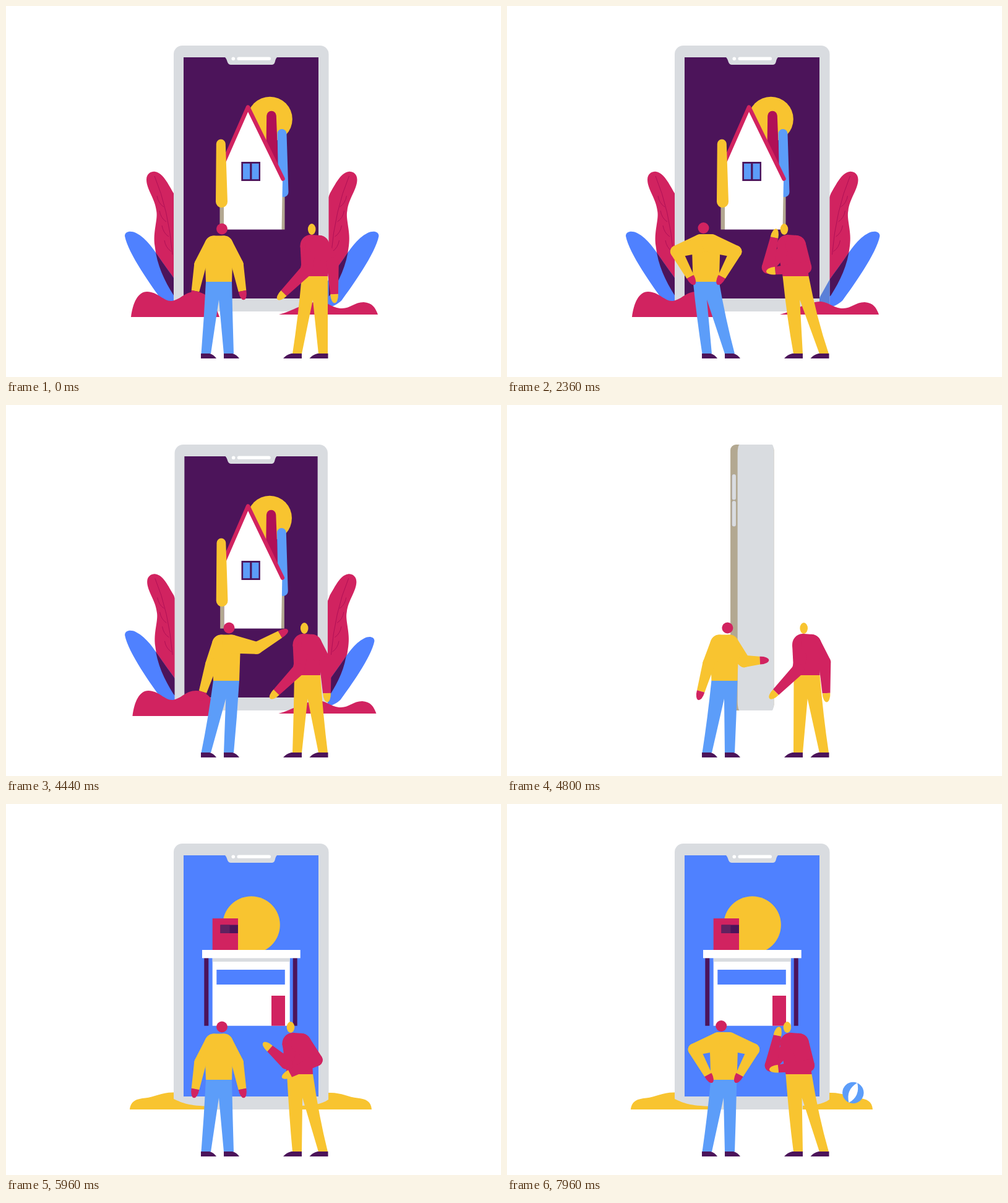
Write an HTML page with a canvas that moves like this. It is 800 px wide and 600 px high and loops after 8000 ms.

```html
<!DOCTYPE html>
<html lang="en">
<head>
<meta charset="utf-8">
<title>House viewing</title>
<style>
html, body { margin: 0; width: 100%; height: 100%; overflow: hidden; background: #fff; }
canvas { display: block; width: 800px; height: 600px; }
</style>
</head>
<body>
<canvas id="stage" width="800" height="600"></canvas>
<script>
const ctx = document.getElementById('stage').getContext('2d');
const LOOP = 8000, MID = 396.25, { PI } = Math;
const RED = '#d12360', WINE = '#b01056', YELLOW = '#f8c430', SKY = '#5c9df9',
  BLUE = '#4f81ff', PURPLE = '#4c145a', GREY = '#d9dce0', BEIGE = '#b3a891', WHITE = '#fff';

const clamp = v => Math.min(1, Math.max(0, v));
const ease = p => (1 - Math.cos(PI * clamp(p))) / 2;
const lerp = (a, b, k) => a + (b - a) * k;
const mix = (a, b, k) => a.map((v, i) => lerp(v, b[i], k));

function fill(color, path) { ctx.fillStyle = color; ctx.fill(path); }
function rect(color, x, y, w, h) { ctx.fillStyle = color; ctx.fillRect(x, y, w, h); }
function round(color, x, y, w, h, r) {
  ctx.fillStyle = color; ctx.beginPath(); ctx.roundRect(x, y, w, h, r); ctx.fill();
}
function oval(color, x, y, rx, ry = rx, turn = 0, from = 0, to = 2 * PI) {
  ctx.fillStyle = color; ctx.beginPath(); ctx.ellipse(x, y, rx, ry, turn, from, to); ctx.fill();
}
function poly(color, ...pts) {
  ctx.fillStyle = color; ctx.beginPath(); pts.forEach(p => ctx.lineTo(...p)); ctx.fill();
}
function scoped(draw) { ctx.save(); draw(); ctx.restore(); }

// Two circles joined by their outer tangents; a flat end stops at the second centre.
function taper(color, [ax, ay], ra, [bx, by], rb, flat = false) {
  const turn = Math.atan2(by - ay, bx - ax), d = Math.hypot(bx - ax, by - ay) || 1;
  const k = Math.acos(Math.max(-1, Math.min(1, (ra - rb) / d)));
  ctx.fillStyle = color;
  ctx.beginPath();
  ctx.arc(ax, ay, ra, turn + k, turn - k + 2 * PI);
  if (flat) {
    for (const side of [-PI / 2, PI / 2]) ctx.lineTo(bx + rb * Math.cos(turn + side), by + rb * Math.sin(turn + side));
  } else ctx.arc(bx, by, rb, turn - k, turn + k);
  ctx.fill();
  return turn;
}

// A pose is left elbow and wrist, right elbow and wrist, head; x counts from the hip centre.
const even = (ex, ey, wx, wy, hx, hy) => [ex, ey, wx, wy, -ex, ey, -wx, wy, hx, hy];
const manPose = {
  down: even(-30, 418, -38, 461, 5, 360.5),
  hips: even(-48, 397, -25.5, 438, -4.2, 359),
  point: [-24, 419, -38, 464, 49, 393, 87, 371, 4.5, 360.5],
  fold: [-27, 417, -38.5, 462, 11, 440, 22, 463.5, 5.5, 360.5]
};
const palPose = {
  down: [-14, 428, -50, 464.5, 29, 416, 31.5, 466, -4.8, 361],
  wave: [-22, 419, -48.5, 395.5, 27, 414, -16, 436, -15, 361],
  think: [-45, 423, -34.5, 374.5, 16, 423, -33, 428, -18.5, 361]
};

// Moves are start, duration, pose, hip centre. Both people settle, sway right, then sway back.
const manLook = (at, sway, back) => [
  [at, 630, 'hips', 339], [sway, 600, 'hips', 355], [back, 500, 'hips', 321.7]
];
const palLook = (at, sway, back) => [
  [at, 370, 'wave', 475], [at + 370, 340, 'think', 466.5], [sway, 580, 'think', 498], [back, 460, 'think', 466.5]
];

const man = {
  poses: manPose, hip: 344, waist: 446, shirt: YELLOW, pants: SKY, skin: RED,
  shoulders: [[-8, 15], [8, 15]], roots: [15, 15], sway: 0, head: [9, 9],
  crotch: hip => 344 + (hip - 344) * 0.94,
  feet: [315.5, 331, 352, 368], shoes: [[315, 1], [352, 1]],
  moves: [
    ...manLook(150, 1050, 1840),
    [2800, 640, 'down', 341], [3620, 600, 'point', 356], [4480, 680, 'fold', 346], [5160, 360, 'down', 344],
    ...manLook(6150, 7000, 7840)
  ]
};
const pal = {
  poses: palPose, hip: 499, waist: 437, shirt: RED, pants: YELLOW, skin: YELLOW,
  shoulders: [[-6, 17.5], [7, 16.5]], roots: [9, 16.5], sway: 0.5, head: [6.3, 9],
  crotch: hip => 484 + (hip - 482) * 0.7,
  feet: [463, 478, 505, 520], shoes: [[478, -1.2], [520.5, -1.2]],
  moves: [
    ...palLook(150, 1060, 1800),
    [2700, 360, 'wave', 480], [3060, 380, 'down', 499], [3800, 640, 'down', 487], [4480, 640, 'down', 482],
    ...palLook(5590, 6860, 7620)
  ]
};

function poseAt({ poses, hip, moves }, t) {
  let now = [hip, ...poses.down];
  for (const [at, span, pose, x] of moves) {
    if (t > at) now = mix(now, [x, ...poses[pose]], ease((t - at) / span));
  }
  return now;
}

function legs(color, hip, waist, crotch, [a, b, c, d]) {
  const l = hip - 21, r = hip + 21;
  ctx.fillStyle = color;
  ctx.beginPath();
  ctx.moveTo(l, waist);
  ctx.quadraticCurveTo(lerp(l, a, 0.4), 505, a, 562.5);
  ctx.lineTo(b, 562.5);
  ctx.lineTo(crotch, 475);
  ctx.lineTo(c, 562.5);
  ctx.lineTo(d, 562.5);
  ctx.quadraticCurveTo(lerp(r, d, 0.4), 505, r, waist);
  ctx.fill();
}

function shoe(heel, dir) {
  ctx.fillStyle = PURPLE;
  ctx.beginPath();
  ctx.moveTo(heel, 562);
  ctx.lineTo(heel + 14 * dir, 562);
  ctx.quadraticCurveTo(heel + 21 * dir, 564, heel + 25 * dir, 570);
  ctx.lineTo(heel, 570);
  ctx.fill();
}

function person(who, t) {
  const { waist, shirt, skin } = who;
  const [hip, ...pose] = poseAt(who, t);
  const joint = i => [hip + pose[i], pose[i + 1]];
  const head = joint(8);
  const lean = (pose[8] + 4.8) * who.sway, y = 386.5 + (head[1] - 360.5) * 1.7;
  const [[lx, lr], [rx, rr]] = who.shoulders;
  const tops = [[hip + lx + lean, y], [hip + rx + lean, y]];

  legs(who.pants, hip, waist - 0.5, who.crotch(hip), who.feet);
  who.shoes.forEach(s => shoe(...s));
  taper(shirt, tops[0], lr, tops[1], rr);
  poly(shirt, [tops[0][0] - lr, y], [tops[1][0] + rr, y], [hip + 21, waist], [hip - 21, waist]);
  tops.forEach((top, i) => {
    const elbow = joint(4 * i), wrist = joint(4 * i + 2);
    taper(shirt, top, who.roots[i], elbow, 9.8);
    const turn = taper(shirt, elbow, 9.8, wrist, 6.4, true);
    oval(skin, ...wrist, 14.5, 6.4, turn, -PI / 2, PI / 2);
  });
  oval(skin, ...head, ...who.head);
}

function cottage() {
  rect(PURPLE, 287, 83, 218, 390);
  oval(YELLOW, 426.5, 183, 36.3);
  taper(WINE, [429, 177.5], 7.8, [430, 260], 10);
  rect(BEIGE, 445, 300, 5.5, 61.5);
  rect(BEIGE, 345.5, 320, 6.5, 41.5);
  taper(SKY, [446, 206.5], 7.5, [448.5, 301], 8);
  poly(WHITE, [391, 166], [447, 281], [445.5, 361.5], [352, 361.5], [352, 244]);
  ctx.strokeStyle = RED;
  ctx.lineWidth = 6.5;
  ctx.lineCap = ctx.lineJoin = 'round';
  ctx.stroke(new Path2D('M353 250L391 163.500L447.500 279.500'));
  taper(YELLOW, [347.3, 223], 7.5, [348.5, 316.5], 9.5);
  rect(PURPLE, 380.3, 252, 30.7, 31);
  for (const x of [383, 397.4]) rect(SKY, x, 254.8, 11.2, 25.4);
}

function beachHouse() {
  rect(BLUE, 287, 83, 218, 390);
  oval(YELLOW, 396.5, 195.5, 46.3);
  rect(BLUE, 340, 236, 120, 10);
  rect(RED, 333.7, 185, 41.3, 52);
  rect(PURPLE, 346.5, 195.5, 28.5, 13.5);
  rect('#61225f', 346.5, 195.5, 15, 13.5);
  for (const x of [320.3, 463.7]) rect(PURPLE, x, 249, 7, 109.7);
  rect(WHITE, 333.7, 249, 125, 109.7);
  rect(GREY, 333.7, 249, 125, 6);
  rect(WHITE, 317, 236, 158.7, 13.3);
  rect(BLUE, 340.3, 268, 110.5, 24);
  rect(RED, 429, 310, 22, 48.7);
}

function phone(turn) {
  const c = Math.cos(turn), s = Math.sin(turn);
  const face = 250.5 * Math.abs(c), edge = 15 * Math.max(0, Math.abs(s) - 0.2);
  const w = face + edge, x = MID - w / 2, right = s * c > 0;
  if (edge) {
    round(BEIGE, x, 64, w, 430, Math.min(9, w / 2));
    const bw = edge * 0.55, bx = (right ? x + face : x) + edge * 0.22;
    for (const y of [112, 155]) {
      round('#8f8590', bx - 0.4, y, bw, 41.5, bw / 2);
      round(GREY, bx, y, bw, 41.5, bw / 2);
    }
  }
  scoped(() => {
    ctx.translate((right ? x : x + edge) + face / 2, 0);
    ctx.scale(Math.max(Math.abs(c), 0.001), 1);
    ctx.translate(-MID, 0);
    round(GREY, 271, 64, 250.5, 430, 14);
    if (c < 0) return;
    if (turn < PI) cottage(); else beachHouse();
    fill(GREY, new Path2D('M354 83H438C434 86 436 95 430 95H363C357 95 358 86 354 83Z'));
    oval(WHITE, 367.3, 85.2, 2.8);
    round(WHITE, 373.5, 82.6, 54.5, 5.2, 2.6);
  });
}

function aboutMid(turn, draw) {
  scoped(() => {
    ctx.translate(MID, 0);
    ctx.scale(Math.cos(turn), 1);
    ctx.translate(-MID, 0);
    draw();
  });
}

function flip() { ctx.translate(794.5, 0); ctx.scale(-1, 1); }

const redLeaf = new Path2D('M227 281C227 270 236 267 241 268C254 270 262 288 271 303L285 340V480L271 468C256 444 244 420 240.500 388C237 365 246 345 243 331C241 312 227 296 227 281Z');
const blueLeaf = new Path2D('M192 372C192 364 202 363 210 367C228 376 240 396 247 406C258 422 270 438 274 444L293 478L276 489C268 487 258 482 252 476C236 454 197 400 192 372Z');
const hills = new Path2D('M202 503C205 480 213 462 228 462C245 462 255 478 268 477C282 475 289 462 306 462C326 463 338 480 345 503ZM441 499C465 493 480 480 505 478C520 478 527 489 543 489C557 489 563 479 578 479C592 480 597 488 601 499Z');
const dunes = new Path2D('M200 494C202 479 212 477 225 475.500C240 474 252 466 271 466.500V477C286 484 295 488 330 489V494ZM591 494C590 481 582 477 568 475.500C553 474 541 466 521 467V478C510 486 495 487 478 488V494Z');

function veins() {
  ctx.strokeStyle = WINE;
  ctx.lineWidth = 1;
  ctx.beginPath();
  ctx.moveTo(240, 275);
  ctx.quadraticCurveTo(263, 330, 269, 402);
  for (let i = 0; i < 4; i++) {
    const x = 255 + i * 4, y = 325 + i * 24;
    ctx.moveTo(x, y);
    ctx.quadraticCurveTo(x - 9, y - 6, x - 11, y - 18);
  }
  ctx.stroke();
}

// Leaves shrink into their root; the right-hand pair is mirrored.
function leaves(t, mirrored) {
  const sink = (start, draw) => scoped(() => {
    const s = 1 - ease((t - start) / 500);
    ctx.translate(272, 482);
    ctx.scale(s, s);
    ctx.translate(-272, -482);
    draw();
  });
  scoped(() => {
    if (mirrored) flip();
    sink(4390, () => { fill(RED, redLeaf); veins(); });
    sink(mirrored ? 4345 : 4430, () => {
      fill(BLUE, blueLeaf);
      ctx.clip(blueLeaf);
      fill(PURPLE, redLeaf);
    });
  });
}

function bezelLeaf() {
  scoped(() => {
    ctx.beginPath();
    ctx.rect(505, 440, 16.5, 54);
    ctx.clip();
    flip();
    fill('#5b80d8', blueLeaf);
  });
}

function ball(t) {
  const p = clamp((t - 6250) / 950);
  if (!p) return;
  const x = lerp(500, 559.3, 1 - (1 - p) ** 3);
  scoped(() => {
    ctx.beginPath();
    ctx.rect(521.5, 400, 100, 120);
    ctx.clip();
    ctx.translate(x, 467);
    ctx.rotate(0.4 + (x - 559.3) / 17);
    oval(SKY, 0, 0, 17.2);
    fill(WHITE, new Path2D('M0 -17.500Q13 0 0 17.500Q-13 0 0 -17.500Z'));
  });
}

function draw(t) {
  rect(WHITE, 0, 0, 800, 600);
  const turn = 2 * PI * ease((t - 4300) / 1390);
  const before = turn < PI / 2, after = turn > PI * 1.5;
  if (before) { leaves(t, false); leaves(t, true); }
  phone(turn);
  if (before) {
    if (t < 4360) bezelLeaf();
    aboutMid(turn, () => fill(RED, hills));
  }
  if (after) aboutMid(turn, () => fill(YELLOW, dunes));
  ball(t);
  person(man, t);
  person(pal, t);
}

const begin = performance.now();
function tick() {
  draw((performance.now() - begin) % LOOP);
  requestAnimationFrame(tick);
}
tick();
</script>
</body>
</html>
```
